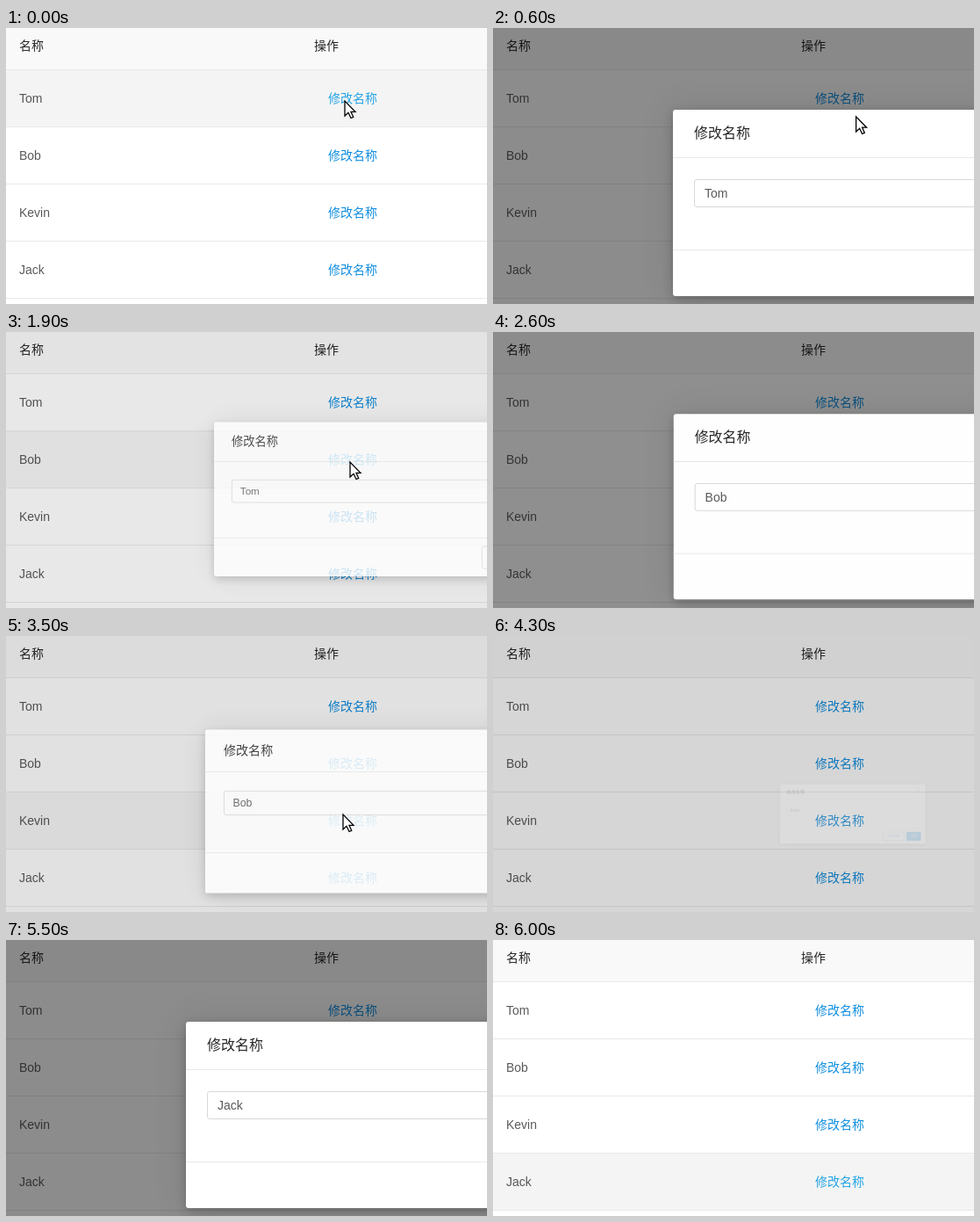
Recreate the animation shown at these times as an HTML page. Size 548 by 314 pixels, loop 6100 ms.

```html
<!DOCTYPE html>
<html lang="zh-CN">
<head>
<meta charset="utf-8">
<style>
html, body { margin: 0; width: 100%; height: 100%; overflow: hidden; background: #fff; }
* { box-sizing: border-box; }
#stage {
  position: relative; width: 548px; height: 314px; overflow: hidden;
  font: 14px "Liberation Sans", "Noto Sans CJK SC", "Noto Sans CJK", sans-serif;
}
.line { position: relative; height: 65px; line-height: 64px; border-bottom: 1px solid #e9e9e9; color: rgba(0,0,0,.65); }
.line span { position: absolute; left: 15px; }
.line .action { left: 367px; color: #108ee0; }
.line.hover .action { color: #24a4e6; }
.head { height: 48px; line-height: 40px; background: #f9f9f9; color: rgba(0,0,0,.85); }
.head .title { left: 351px; }
#mask { position: absolute; inset: 0; background: rgba(0,0,0,.45); }
#modal {
  position: absolute; left: 205px; top: 93px; width: 520px; height: 212px;
  background: #fff; border-radius: 3px;
  box-shadow: 0 4px 12px rgba(0,0,0,.2), 0 0 40px rgba(0,0,0,.1);
}
#modal > * { position: absolute; }
.caption { left: 0; width: 520px; height: 55px; padding-left: 24px; line-height: 54px; font-size: 16px; color: rgba(0,0,0,.85); border-bottom: 1px solid #e9e9e9; }
.close { left: 488px; top: 21px; }
#field { left: 24px; top: 79px; width: 472px; height: 32px; padding-left: 11px; line-height: 30px; border: 1px solid #d9d9d9; border-radius: 3px; color: rgba(0,0,0,.65); }
.foot { left: 0; top: 159px; width: 520px; border-top: 1px solid #e9e9e9; }
.button { top: 170px; height: 32px; line-height: 30px; text-align: center; border: 1px solid #d9d9d9; border-radius: 4px; color: rgba(0,0,0,.65); }
#cancel { left: 368px; width: 76px; }
#cancel.active { color: #49a9ee; border-color: #49a9ee; }
.ok { left: 452px; width: 52px; color: #fff; background: #108ee9; border-color: #108ee9; }
#pointer { position: absolute; left: 0; top: 0; overflow: visible; }
</style>
</head>
<body>
<div id="stage">
  <div id="table">
    <div class="line head"><span>名称</span><span class="title">操作</span></div>
  </div>
  <div id="mask"></div>
  <div id="modal">
    <div class="caption">修改名称</div>
    <svg class="close" width="10" height="10"><path d="M0 0L10 10M10 0L0 10" stroke="#999" stroke-width="1.5"/></svg>
    <div id="field"></div>
    <div class="foot"></div>
    <div class="button" id="cancel">Cancel</div>
    <div class="button ok">OK</div>
  </div>
  <svg id="pointer" width="1" height="1">
    <path id="arrow" d="M0 0V17L4 13.3L7 19.5L9.7 18.3L7 12.3H12Z" fill="#fff" stroke="#000" stroke-width="1.3"/>
    <g id="beam" fill="none">
      <path d="M-4-7H-1L0-6L1-7H4M0-6V6M-4 7H-1L0 6L1 7H4" stroke="#fff" stroke-width="3.5"/>
      <path d="M-4-7H-1L0-6L1-7H4M0-6V6M-4 7H-1L0 6L1 7H4" stroke="#000" stroke-width="1.6"/>
    </g>
  </svg>
</div>
<script>
const LOOP = 6100, STEP = 100, FADE = 300;
const names = ['Tom', 'Bob', 'Kevin', 'Jack'];

// Each dialog grows out of the clicked point and shows the previous name until it is fully open.
const dialogs = [
  { open: 290, close: 1032, x: 386, y: 84, before: 'Tom' },
  { open: 1840, close: 2592, x: 392, y: 148, before: 'Tom' },
  { open: 3422, close: 4108, x: 384, y: 204, before: 'Bob' },
  { open: 4771, close: 5510, x: 405, y: 285, before: 'Kevin' }
];

// Pointer stops: time, x, y
const route = [
  [0, 386, 83], [580, 386, 83], [800, 690, 280], [1060, 690, 280],
  [1200, 402, 160], [1500, 392, 148], [2100, 392, 148], [2300, 690, 280],
  [2900, 690, 280], [3190, 384, 203], [3720, 384, 203], [3900, 690, 280],
  [4400, 690, 280], [4700, 403, 285], [5050, 403, 285], [5200, 690, 280], [LOOP, 690, 280]
];

const $ = id => document.getElementById(id);
const clamp = v => Math.max(0, Math.min(1, v));

function bezier(x1, y1, x2, y2) {
  const curve = (a, b, u) => 3 * a * u * (1 - u) ** 2 + 3 * b * u * u * (1 - u) + u ** 3;
  return x => {
    let low = 0, high = 1;
    for (let i = 0; i < 24; i++) {
      const mid = (low + high) / 2;
      if (curve(x1, x2, mid) < x) low = mid; else high = mid;
    }
    return x <= 0 ? 0 : x >= 1 ? 1 : curve(y1, y2, low);
  };
}
const easeOutCirc = bezier(.08, .82, .17, 1);
const easeInOutCirc = bezier(.78, .14, .15, .86);

const rows = names.map(name => {
  const row = document.createElement('div');
  row.className = 'line';
  row.innerHTML = `<span>${name}</span><span class="action">修改名称</span>`;
  $('table').append(row);
  return row;
});

function pointerAt(t) {
  const i = route.findIndex(stop => stop[0] > t);
  const [t0, x0, y0] = route[i - 1], [t1, x1, y1] = route[i];
  const k = (t - t0) / (t1 - t0);
  return [x0 + (x1 - x0) * k, y0 + (y1 - y0) * k];
}

function drawDialog(t) {
  const index = dialogs.findIndex(d => t >= d.open && t < d.close + FADE);
  const visible = index >= 0;
  $('mask').hidden = $('modal').hidden = !visible;
  $('mask').style.display = $('modal').style.display = visible ? '' : 'none';
  if (!visible) return;

  const d = dialogs[index];
  const opening = clamp((t - d.open) / FADE), closing = clamp((t - d.close) / FADE);
  const zoom = closing > 0 ? 1 - easeInOutCirc(closing) : easeOutCirc(opening);
  $('mask').style.opacity = opening - closing;
  const style = $('modal').style;
  style.transformOrigin = `${d.x - 205}px ${d.y - 93}px`;
  style.transform = zoom < 1 ? `scale(${.2 + .8 * zoom})` : 'none';
  style.opacity = zoom;
  $('field').textContent = opening < 1 ? d.before : names[index];
  $('cancel').classList.toggle('active', t >= d.close);
}

function drawHover(t, y) {
  const covering = dialogs.find(d => t >= d.open && t < d.close + FADE);
  const last = dialogs.filter(d => t >= d.close + FADE).pop();
  const amount = covering ? 1 - clamp((t - covering.open) / FADE)
    : last ? clamp((t - last.close - FADE) / 150) : 1;
  const current = Math.floor((y - 48) / 65);
  rows.forEach((row, i) => {
    const level = i === current ? amount : 0;
    row.style.background = `rgba(0,0,0,${.045 * level})`;
    row.classList.toggle('hover', level > .5);
  });
}

function draw(t) {
  const [x, y] = pointerAt(t);
  const overText = t >= 1100 && t < 1300;
  drawDialog(t);
  drawHover(t, y);
  $('pointer').style.transform = `translate(${x}px, ${y}px)`;
  $('arrow').style.display = overText ? 'none' : '';
  $('beam').style.display = overText ? '' : 'none';
}

const start = performance.now();
function tick() {
  const t = (performance.now() - start) % LOOP;
  draw(Math.floor(t / STEP) * STEP);
  requestAnimationFrame(tick);
}
tick();
</script>
</body>
</html>
```
